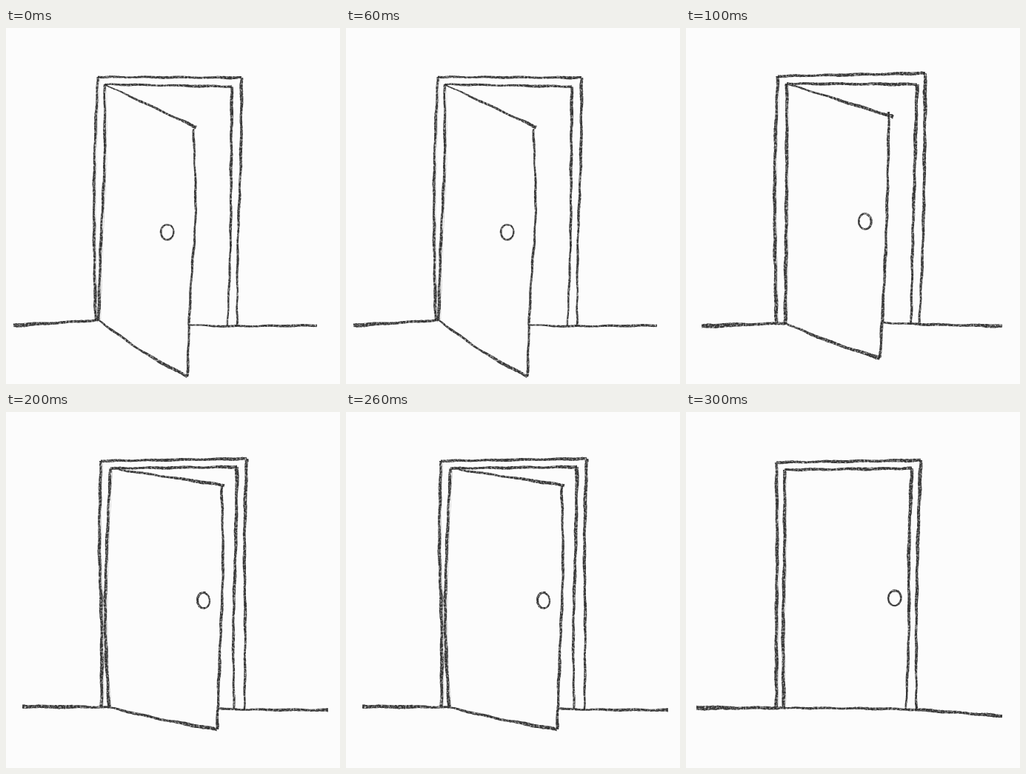
These frames come from a looping animation (451x480 px, 0.4 s). An HTML page:

```html
<!DOCTYPE html>
<html lang="en">
<head>
<meta charset="utf-8">
<title>Closing door</title>
<style>
html, body { margin: 0; width: 100%; height: 100%; overflow: hidden; background: #fcfcfc; }
svg { display: block; width: 100vw; height: 100vh; }
</style>
</head>
<body>
<svg id="stage" viewBox="0 0 451 480">
  <filter id="charcoal" filterUnits="userSpaceOnUse" x="0" y="0" width="451" height="480" color-interpolation-filters="sRGB">
    <feTurbulence type="fractalNoise" baseFrequency=".4" numOctaves="2" seed="4"/>
    <feColorMatrix values="0 0 0 0 0  0 0 0 0 0  0 0 0 0 0  0 0 0 1.8 0" result="grain"/>
    <feGaussianBlur in="SourceGraphic" stdDeviation=".4"/>
    <feComposite in2="grain" operator="in"/>
  </filter>
</svg>
<script>
const NS = "http://www.w3.org/2000/svg";
const STEP = 100;
const stage = document.getElementById("stage");

// Uprights list their x at even heights from top to foot; tops hold the
// left and right corner heights. A shut door has no leaf.
const poses = [
  {
    weight: .92, feet: [394, 402], floor: [10, 401, 420, 401], knob: [218, 275.5],
    outer: { top: [66, 67], left: [124, 119.5, 119, 121], right: [318, 317, 313, 312] },
    inner: { top: [76, 79], left: [133, 133, 128, 125], right: [305, 304, 303, 299] },
    leaf: { tip: [257, 134], edge: [253, 256, 249, 245], y: [136, 470] }
  },
  {
    weight: 1.1, feet: [398, 399], floor: [21, 402, 427, 402], knob: [241.5, 261],
    outer: { top: [65, 61], left: [124, 120, 120, 122], right: [323, 322, 320, 315] },
    inner: { top: [75, 76], left: [136, 136, 135, 134], right: [312, 309, 306, 304] },
    leaf: { tip: [280, 120], edge: [274, 272, 268, 262], y: [113, 445] }
  },
  {
    weight: 1.05, feet: [398, 401], floor: [22, 397, 435, 402], knob: [266.5, 254],
    outer: { top: [66, 63], left: [128, 126, 129, 129], right: [325, 322, 323, 322] },
    inner: { top: [76, 74], left: [141, 136, 134, 139], right: [312, 310, 307, 308] },
    leaf: { tip: [295, 99], edge: [291, 293, 289, 285], y: [97, 428] }
  },
  {
    weight: 1.1, feet: [399, 401], floor: [14, 399, 427, 410], knob: [282, 251],
    outer: { top: [68, 65], left: [122, 123, 122, 122], right: [317, 313, 311, 311] },
    inner: { top: [78, 76], left: [133, 133, 131, 132], right: [305, 301, 301, 297] }
  }
];

function random(seed) {
  return () => (seed = seed * 16807 % 2147483647) / 2147483647;
}

function add(parent, tag, attrs) {
  const node = document.createElementNS(NS, tag);
  for (const key in attrs) node.setAttribute(key, attrs[key]);
  return parent.appendChild(node);
}

// Catmull-Rom between b and c.
function curve(a, b, c, d, t) {
  return b + t / 2 * (c - a + t * (2 * a - 5 * b + 4 * c - d + t * (3 * (b - c) + d - a)));
}

function sample(points) {
  const line = [], at = i => points[Math.max(0, Math.min(points.length - 1, i))];
  for (let i = 0; i < points.length - 1; i++) {
    const [a, b, c, d] = [at(i - 1), at(i), at(i + 1), at(i + 2)];
    const n = Math.max(2, Math.round(Math.hypot(c[0] - b[0], c[1] - b[1]) / 2));
    for (let k = 0; k < n; k++) line.push([0, 1].map(j => curve(a[j], b[j], c[j], d[j], k / n)));
  }
  line.push(at(points.length));
  return line;
}

// Returns a pen that draws tapered, slightly shaky strokes into the group.
function charcoal(group, weight, rnd) {
  return (points, from, to, opacity = .92) => {
    const line = sample(points), last = line.length - 1;
    const phase = rnd() * 6, left = [], right = [];
    line.forEach(([x, y], i) => {
      const p = line[Math.max(0, i - 1)], q = line[Math.min(last, i + 1)];
      const dx = q[0] - p[0], dy = q[1] - p[1], len = Math.hypot(dx, dy) || 1;
      const swell = 1 + .14 * Math.sin(i * .17 + phase);
      const half = weight * swell * (from + (to - from) * i / last) / 2;
      const shake = .4 * Math.sin(i * .31 + phase * 2);
      const place = side => {
        const d = shake + side * half * (.85 + .3 * rnd());
        return [x - dy / len * d, y + dx / len * d];
      };
      left.push(place(1));
      right.unshift(place(-1));
    });
    const outline = left.concat(right).map(p => p.map(v => v.toFixed(1)).join()).join(" ");
    add(group, "polygon", { points: outline, fill: "#242424", "fill-opacity": opacity });
  };
}

function upright(xs, top, foot) {
  return xs.map((x, i) => [x, top + (foot - top) * i / (xs.length - 1)]);
}

function ring([cx, cy], rx, ry) {
  return Array.from({ length: 15 }, (_, i) => {
    const a = i * Math.PI / 7 - 1.2;
    return [cx + rx * Math.cos(a), cy + ry * Math.sin(a)];
  });
}

function drawPose({ weight, feet, floor, knob, outer, inner, leaf }, i) {
  const group = add(stage, "g", { filter: "url(#charcoal)", visibility: "hidden" });
  const pen = charcoal(group, weight, random(97 + i * 31));
  const [x0, y0, x1, y1] = floor;

  for (const { top, left, right } of [outer, inner]) {
    const l = upright(left, top[0], feet[0]), r = upright(right, top[1], feet[1]);
    pen([l[0], r[0]], 3, 3.8);
    pen(l, 3.4, 4);
    pen(r, 4.4, 2.6);
    pen(l.map(([x, y]) => [x + 2.5, y + 3]), .8, 1.2, .2);
  }

  const hinge = [inner.left[0], inner.top[0]], foot = [inner.left[3], feet[0]];
  let crossing = foot;
  if (leaf) {
    const edge = upright(leaf.edge, ...leaf.y), corner = edge[3];
    const sag = [(foot[0] + corner[0]) / 2, (foot[1] + corner[1]) / 2 + (corner[1] - foot[1]) * .06];
    crossing = [corner[0] + 2, feet[1] - 2];
    pen([hinge, leaf.tip], 1.8, 4.4);
    pen(edge, 3, 3.6);
    pen([foot, sag, corner], 2.6, 4.6);
  }
  pen([[x0, y0], foot], 5.4, 3);
  pen([crossing, [inner.right[3], feet[1]], [x1, y1]], 2.4, 4);
  pen(ring(knob, 8.4, 10.4), 2.4, 2.8);
  return group;
}

const groups = poses.map(drawPose);

function show(time) {
  const now = Math.floor(time / STEP) % groups.length;
  groups.forEach((g, i) => g.setAttribute("visibility", i === now ? "visible" : "hidden"));
}

const start = performance.now();
function tick() {
  show(performance.now() - start);
  requestAnimationFrame(tick);
}
tick();
</script>
</body>
</html>
```
